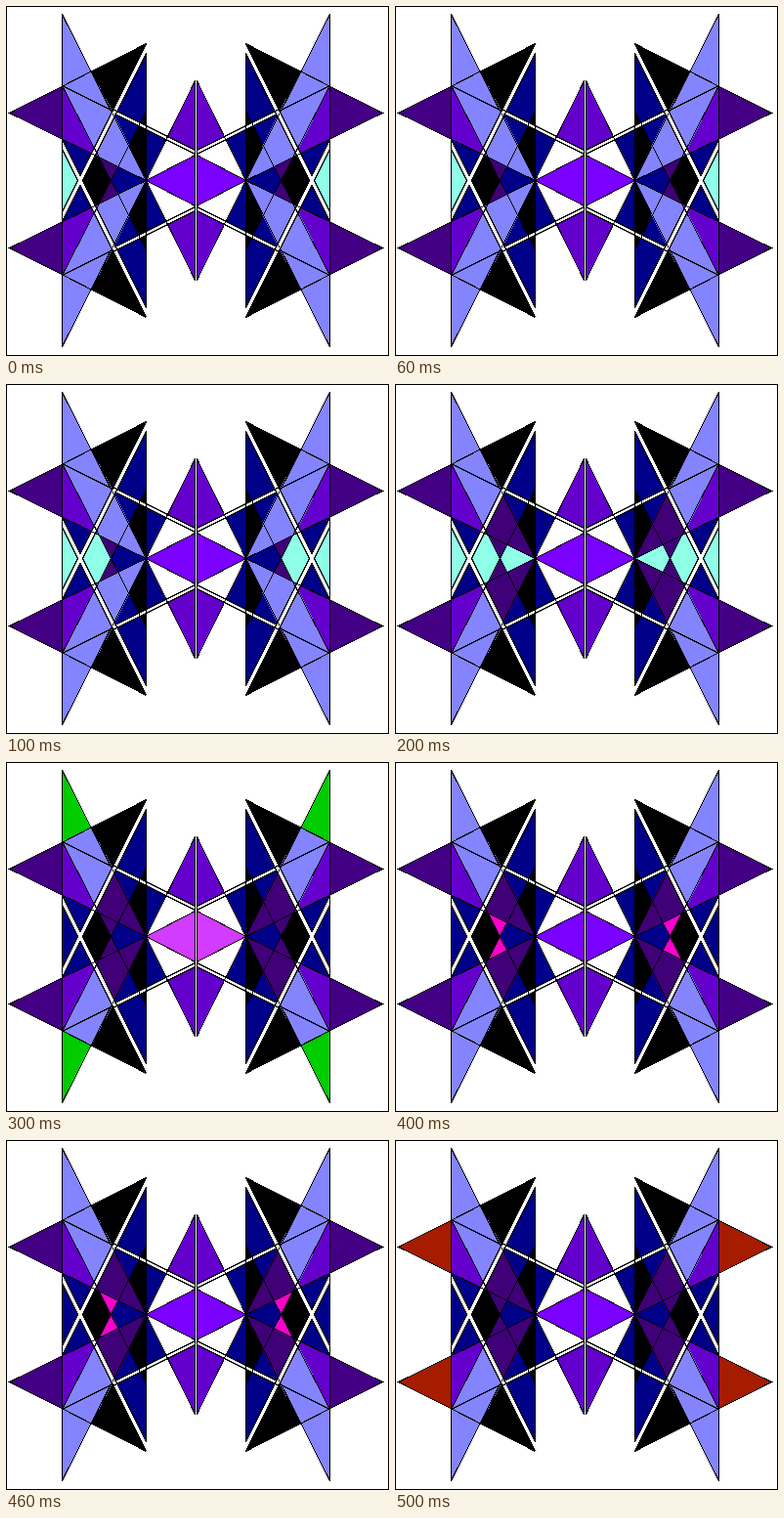
These frames come from a looping animation (392 px wide and 358 px high, 600 ms). An HTML page:

```html
<!DOCTYPE html>
<html lang="en">
<head>
<meta charset="utf-8">
<title>Kaleidoscope</title>
<style>
html, body { margin: 0; width: 100%; height: 100%; overflow: hidden; background: #fff; }
svg { display: block; width: 392px; height: 358px; shape-rendering: crispEdges; }
:root {
  --peri: #8484ff; --violet: #6400cc; --plum: #3f0078; --navy: #000088;
  --cyan: #90ffe8; --tip: #440084; --core: #7a00ff;
}
.peri { fill: var(--peri); }
.violet { fill: var(--violet); }
.navy { fill: var(--navy); }
.black { fill: #000; }
.gap { fill: #fff; }
.line { fill: none; stroke: #000; }
.seam { fill: none; stroke: #fff; }

.tip, .spike, .band, .wedge, .kite, .gem, .side, .core { animation: 600ms step-end infinite; }
.tip { fill: var(--tip); animation-name: tip; }
.spike { fill: var(--peri); animation-name: spike; }
.band { fill: var(--peri); animation-name: band; }
.wedge { fill: var(--plum); animation-name: wedge; }
.kite { fill: #000; animation-name: kite; }
.gem { fill: var(--navy); animation-name: gem; }
.side { fill: var(--cyan); animation-name: side; }
.core { fill: var(--core); animation-name: core; }

@keyframes tip { 0% { fill: var(--tip); } 83.333%, 100% { fill: #a61c00; } }
@keyframes spike { 0%, 66.667%, 100% { fill: var(--peri); } 50% { fill: #00cc00; } }
@keyframes band { 0% { fill: var(--peri); } 33.333%, 100% { fill: var(--plum); } }
@keyframes wedge { 0%, 83.333%, 100% { fill: var(--plum); } 66.667% { fill: #ff00cc; } }
@keyframes kite { 0%, 50%, 100% { fill: #000; } 16.667% { fill: var(--cyan); } }
@keyframes gem { 0%, 50%, 100% { fill: var(--navy); } 33.333% { fill: var(--cyan); } }
@keyframes side { 0% { fill: var(--cyan); } 50%, 100% { fill: var(--navy); } }
@keyframes core { 0%, 66.667%, 100% { fill: var(--core); } 50% { fill: #d23cff; } }
</style>
</head>
<body>
<svg viewBox="0 0 392 358">
  <g id="art" transform="translate(.5 .5)"></g>
  <rect x=".5" y=".5" width="391" height="357" class="line"/>
</svg>
<script>
const art = document.getElementById("art");

function add(parent, tag, attrs) {
  const el = document.createElementNS("http://www.w3.org/2000/svg", tag);
  for (const key in attrs) el.setAttribute(key, attrs[key]);
  return parent.appendChild(el);
}

// One quarter of the figure, as [class, points]
const quarter = [
  ["side", "57,146 73,178 57,178"],
  ["navy", "57,136 92,153 75.5,173"],
  ["kite", "78,178 93,148 107,178"],
  ["gem", "107,178 114,164 143,178"],
  ["wedge", "93,152 114,164 107,178"],
  ["black", "87,67 143,38 109,108"],
  ["navy", "143,48 112,108 143,124"],
  ["navy", "109,108 143,124 143,178"],
  ["black", "143,107 125,142 143,178"],
  ["navy", "143,124 165,135 143,178"],
  ["violet", "193,76 165,134 193,148"],
  ["core", "143,178 193,152 193,178"],
  ["band", "109,108 90,147 93,153 143,178"],
  ["tip", "3,109 57,81 57,136"],
  ["violet", "57,81 57,136 93,153"],
  ["spike", "57,8 57,81 87,67"],
  ["peri", "57,81 87,67 109,108 90,147"],
  ["gap", "143,38 143,48 78,178 73,178"],
  ["gap", "57,136 78,178 73,178 57,146"],
  ["gap", "109,105 194,147.5 194,151.5 111,110"],
  ["seam", "194,76 194,178"],
  ["line", "57,178 57,8 143,178"],
  ["line", "143,38 3,109 143,178 193,152"],
  ["line", "57,81 107,178 143,107"],
  ["line", "57,81 109,107"],
  ["line", "143,38 75.5,173 57,136"],
  ["line", "143,178 143,48 78,178"],
  ["line", "57,146 73,178"],
  ["line", "109,105 193,147"],
  ["line", "111,110 193,151"],
  ["line", "143,178 193,76 193,178"]
];

const flips = [
  "",
  "matrix(1 0 0 -1 0 356)",
  "matrix(-1 0 0 1 388 0)",
  "matrix(-1 0 0 -1 388 356)"
];

for (const transform of flips) {
  const group = add(art, "g", { transform });
  for (const [name, points] of quarter) {
    const open = name === "line" || name === "seam";
    add(group, open ? "polyline" : "polygon", { class: name, points });
  }
}
</script>
</body>
</html>
```
